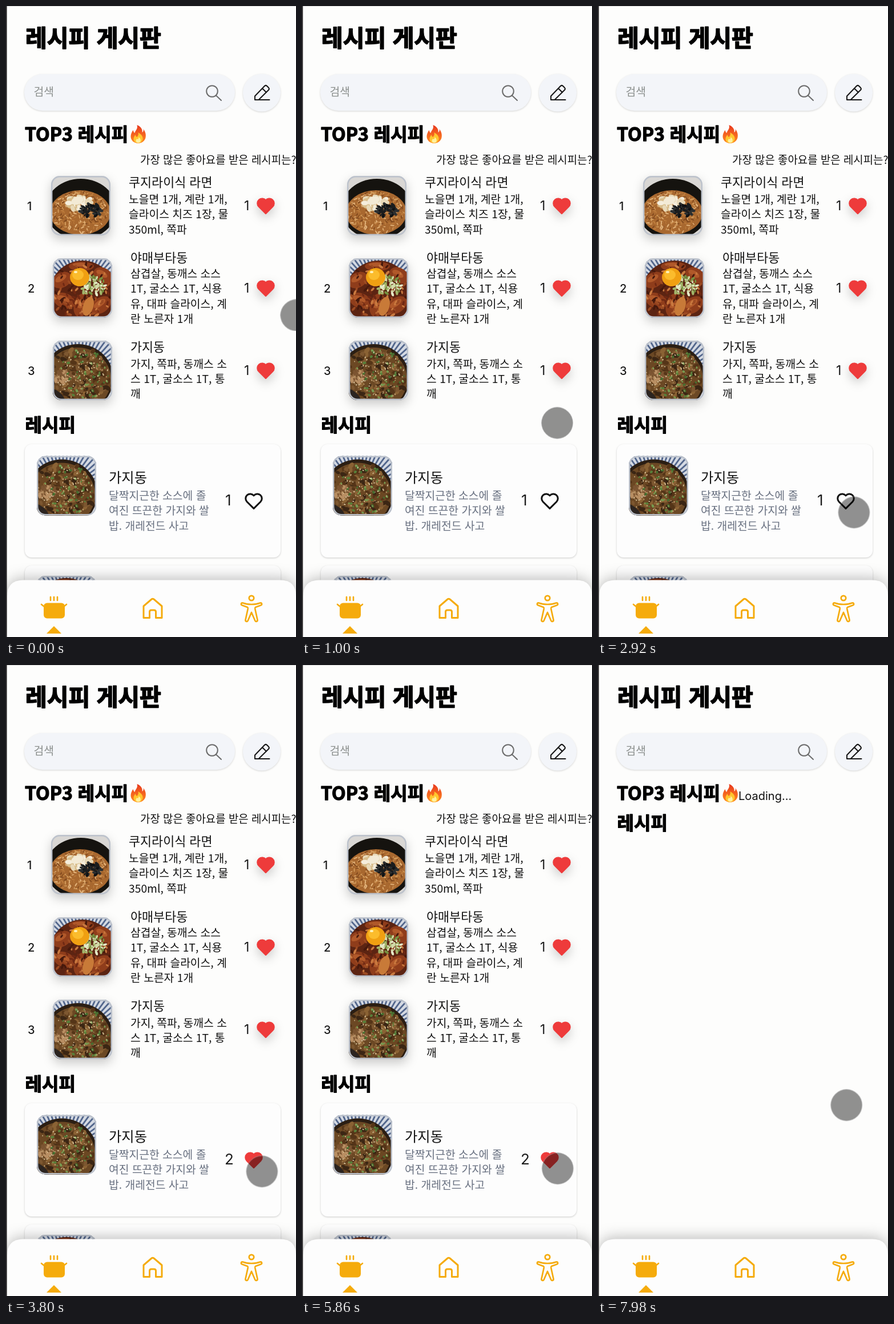
Write an HTML page that moves like this. It is 508 px wide and 1103 px high and loops after 8 s.

```html
<!DOCTYPE html>
<html lang="ko">
<head>
<meta charset="utf-8">
<title>레시피 게시판</title>
<style>
html, body { margin: 0; width: 100%; height: 100%; overflow: hidden; background: #fdfdfc; }
svg { display: block; }
text { font-family: "Noto Sans CJK KR", "Noto Sans CJK", sans-serif; white-space: pre; }
text.num { font-family: Inter, Roboto, sans-serif; }
text.heavy { stroke: #000; stroke-width: .04em; stroke-linejoin: round; }
.field { fill: #f3f5f9; filter: drop-shadow(0 1.5px 1.5px rgba(0, 0, 0, .16)); }
.card { fill: #fdfdfd; filter: drop-shadow(0 1px 1.5px rgba(0, 0, 0, .2)); }
.lift { filter: drop-shadow(0 7px 9px rgba(0, 0, 0, .2)); }
.bar { fill: #fdfdfd; filter: drop-shadow(0 -3px 12px rgba(0, 0, 0, .26)); }
.line { fill: none; stroke-linecap: round; stroke-linejoin: round; }
</style>
</head>
<body>
<svg id="stage" width="508" height="1103" viewBox="0 0 508 1103"></svg>
<script>
const LOOP = 8000, LIKE_AT = 3450, RELOAD_AT = 7800;
const ORANGE = '#f5ab0c', RED = '#ee3b3b';

// Text is placed by its left edge and vertical centre.
const text = (x, cy, s, size, weight = 300, fill = '#111', cls = '') =>
  `<text class="${cls}" x="${x}" y="${cy + size * .37}" font-size="${size}" font-weight="${weight}" fill="${fill}">${s}</text>`;
const num = (x, cy, s, size, weight = 400) => text(x, cy, s, size, weight, '#1c1c1c', 'num');
const heading = (x, cy, s, size) => text(x, cy, s, size, 900, '#000', 'heavy');
const lines = (x, cy, list, fill) =>
  list.map((s, i) => text(x, cy + i * 26.3, s, 19.3, 300, fill)).join('');
const stroke = (d, color, width) => `<path class="line" d="${d}" stroke="${color}" stroke-width="${width}"/>`;
const ellipse = (x, y, rx, ry, fill, turn = 0) =>
  `<ellipse cx="${x}" cy="${y}" rx="${rx}" ry="${ry}" fill="${fill}" transform="rotate(${turn} ${x} ${y})"/>`;
const heart = (x, y, fill = RED, edge = RED) =>
  `<path d="M7.5 .6L0 8L-7.5 .6A5 5 0 1 1 0-6A5 5 0 1 1 7.5 .6Z" transform="translate(${x} ${y}) scale(1.6)"
    fill="${fill}" stroke="${edge}" stroke-width="1.9" stroke-linejoin="round"/>`;

function random(seed) {
  return (lo, hi) => {
    seed = (seed * 16807) % 2147483647;
    return lo + (hi - lo) * seed / 2147483647;
  };
}

// Scatters small flecks over an elliptical area.
function flecks(seed, count, [cx, cy, rx, ry], colors, size, thin = .5) {
  const r = random(seed);
  let out = '';
  for (let i = 0; i < count; i++) {
    const a = r(0, 6.283), d = Math.sqrt(r(0, 1)), s = r(size * .5, size);
    out += ellipse((cx + Math.cos(a) * d * rx).toFixed(1), (cy + Math.sin(a) * d * ry).toFixed(1),
      s.toFixed(1), (s * thin).toFixed(1), colors[i % colors.length], r(0, 180) | 0);
  }
  return out;
}

function plate(cx, cy) {
  let out = '<rect width="104" height="104" fill="#d5dae3"/>';
  for (let a = 180; a < 360; a += 6)
    out += `<rect x="${cx + 45}" y="${cy - 1.4}" width="50" height="2.8" fill="#52668c" transform="rotate(${a} ${cx} ${cy})"/>`;
  return out;
}

const photos = {
  noodles: '<rect width="104" height="104" fill="#d9d7d4"/>' +
    ellipse(52, 58, 62, 53, '#15130f') + ellipse(51, 64, 53, 39, '#a8682f') +
    flecks(7, 300, [51, 64, 50, 37], ['#d29a5a', '#824a1f', '#bd7c3c', '#e2b279'], 4, .3) +
    flecks(13, 40, [50, 47, 20, 13], ['#e8d9b8', '#f5eddb', '#d8bd8b'], 8, .6) +
    ellipse(46, 43, 11, 7, '#f3ead5', -20) +
    flecks(11, 50, [70, 60, 19, 11], ['#1b1d1e', '#2c2f30', '#101214'], 5, .55),
  pork: plate(52, 60) + ellipse(52, 62, 58, 58, '#5c2412') +
    [[16, 38, 18, 13, -30], [88, 30, 18, 13, 30], [20, 74, 20, 13, 20], [50, 82, 13, 21, 15], [84, 82, 20, 13, -35], [50, 14, 22, 8, 0]]
      .map(([x, y, a, b, turn]) => ellipse(x, y, a, b, '#8f3d1b', turn) + ellipse(x - 2, y - 3, a * .6, b * .4, '#b1592a', turn)).join('') +
    flecks(5, 130, [52, 60, 54, 52], ['#6f2813', '#c9793f', '#47190c', '#9c4a22'], 5, .45) +
    ellipse(62, 84, 9, 17, '#c87a38', 18) +
    flecks(23, 75, [70, 49, 22, 18], ['#d3dba9', '#a3b56a', '#e6eac9', '#75903f'], 4.5, .5) +
    ellipse(47, 33, 17, 16, '#f0a012') + ellipse(44, 29, 10, 9, '#fbbc2c') + ellipse(40, 24, 3, 2, '#fff1b8'),
  eggplant: plate(46, 64) + ellipse(44, 66, 62, 60, '#2b1e13') + ellipse(44, 68, 58, 56, '#6b4824') +
    flecks(31, 170, [46, 64, 54, 50], ['#553518', '#8a6234', '#6b4722', '#3b2614', '#7d5730'], 7, .6) +
    flecks(37, 30, [18, 63, 15, 12], ['#b98f63', '#9a7048', '#7c5532'], 6, .5) +
    flecks(41, 55, [52, 60, 46, 44], ['#58803a', '#466f30', '#789a50'], 3.2, .7) +
    flecks(43, 130, [50, 60, 48, 46], ['#e0cda6', '#c3a272'], 1.7, .6) +
    ellipse(6, 96, 18, 8, '#2b2420', 38)
};

const photo = (name, x, y) => `<g transform="translate(${x} ${y})">
  <g clip-path="url(#frame)">${photos[name]}</g>
  <rect x="1.2" y="1.2" width="101.6" height="101.6" rx="14" fill="none" stroke="#bcc2cc" stroke-width="2.4"/></g>`;
const lift = s => `<g class="lift">${s}</g>`;

const ranks = [
  { name: 'noodles', shift: -3, top: 297, title: '쿠지라이식 라면', titleY: 308, bodyY: 338,
    body: ['노을면 1개, 계란 1개,', '슬라이스 치즈 1장, 물', '350ml, 쪽파'] },
  { name: 'pork', shift: 0, top: 441, title: '야매부타동', titleY: 440, bodyY: 468,
    body: ['삼겹살, 동깨스 소스', '1T, 굴소스 1T, 식용', '유, 대파 슬라이스, 계', '란 노른자 1개'] },
  { name: 'eggplant', shift: 0, top: 585, title: '가지동', titleY: 596, bodyY: 625.5,
    body: ['가지, 쪽파, 동깨스 소', '스 1T, 굴소스 1T, 통', '깨'] }
];
const rank = (r, i) => num(i ? 38 : 37, r.top + 53, i + 1, 20, 500) + lift(photo(r.name, 82 + r.shift, r.top)) +
  text(218 + r.shift, r.titleY, r.title, 21.8) + lines(218 + r.shift, r.bodyY, r.body) +
  num(417, r.top + 51, 1, 23) + lift(heart(455, r.top + 52.5));

const flame = `<g transform="translate(231.5 224)">
  <path d="M-2-16C6-13 8-7 7-3C9-4 10-7 9-9C13-4 14 1 13 6C12 12 6 16 0 16C-7 16-13 11-13 4C-13 0-11-4-9-7C-8-5-8-3-6-2C-5-7 0-9-2-16Z" fill="url(#fire)"/>
  <path d="M0-3C5 0 9 4 8 9C7 13 4 15.5 0 15.5C-5 15.5-8 12-8 8C-8 5-6 3-5 1C-4 4-3 5-2 5C0 3 1 0 0-3Z" fill="#ffc62f"/>
  <path d="M1 5C4 8 5 10 4 13C2 16-3 16-4 12C-4 10-3 9-2 8C-1 10 1 9 1 5Z" fill="#fff0a0"/></g>`;

const header = heading(34, 56, '레시피 게시판', 41) +
  '<rect class="field" x="32" y="119" width="369" height="64" rx="32"/>' +
  text(48.5, 150, '검색', 19.3, 300, '#8b8f8d') +
  '<circle cx="361" cy="149" r="9.8" fill="none" stroke="#6b6b6b" stroke-width="2"/>' + stroke('M368 156.5L377 165', '#6b6b6b', 2) +
  '<circle class="field" cx="448" cy="151.5" r="33"/>' +
  stroke('M436 164V157.5L453 139.8Q455 138 457 139.8L460 142.8Q461.8 144.8 460 146.8L442.5 164ZM442.5 164H461.5M449 144L456 151', '#161616', 2) +
  heading(33, 224, 'TOP3 레시피', 32) + flame;

const list = text(235, 269, '가장 많은 좋아요를 받은 레시피는?', 18.9) + ranks.map(rank).join('') +
  heading(33.5, 732, '레시피', 32) +
  '<rect class="card" x="33" y="766" width="448" height="198" rx="12"/><rect class="card" x="33" y="978" width="448" height="198" rx="12"/>' +
  photo('eggplant', 54, 786.5) + photo('pork', 54, 996) +
  text(180, 824, '가지동', 24.3) +
  lines(180, 856, ['달짝지근한 소스에 졸', '여진 뜨끈한 가지와 쌀', '밥. 개레전드 사고'], '#687080') +
  '<g id="before">' + num(384, 863, 1, 26) + heart(434, 865.5, 'none', '#111') + '</g>' +
  '<g id="after">' + num(383, 863, 2, 26) + heart(434, 865.5) + '</g>';

const nav = '<path class="bar" d="M2 1103V1032Q2 1003.5 31 1003.5H480Q508 1003.5 508 1032V1103Z"/>' +
  `<rect x="66" y="1043.5" width="37" height="27" rx="6" fill="${ORANGE}"/><path d="M71 1097L84 1084L97 1097Z" fill="${ORANGE}"/>` +
  stroke('M62 1046L67 1050M106 1046L101 1050M78 1033V1039M84 1033V1039M90 1033V1039', ORANGE, 2.6) +
  stroke('M241 1049L255 1037Q257 1035.5 259 1037L273 1049V1069.5H262.5V1059Q262.5 1056 259.5 1056H254.5Q251.5 1056 251.5 1059V1069.5H241Z', ORANGE, 3) +
  `<circle cx="430" cy="1035" r="4.2" fill="none" stroke="${ORANGE}" stroke-width="2.8"/>` +
  stroke('M415 1043.5C420 1045.5 425 1046 430 1046S440 1045.5 445 1043.5C448.5 1042.8 449 1046.5 446.5 1047.5L437 1051Q436 1051.5 436.3 1054L440.5 1073C441 1076 437.5 1077 436.3 1074.5L430 1060L423.7 1074.5C422.5 1077 419 1076 419.5 1073L423.7 1054Q424 1051.5 423 1051L413.5 1047.5C411 1046.5 411.5 1042.8 415 1043.5Z', ORANGE, 2.7);

const stage = document.getElementById('stage');
stage.innerHTML = `<defs>
  <clipPath id="frame"><rect width="104" height="104" rx="15"/></clipPath>
  <linearGradient id="fire" x1="0" y1="0" x2="0" y2="1"><stop offset="0" stop-color="#e8391f"/><stop offset="1" stop-color="#ff8a1f"/></linearGradient></defs>
  <rect width="508" height="1103" fill="#fdfdfc"/>${header}
  <g id="list">${list}</g>
  <g id="loading">${text(246, 229, 'Loading...', 20, 400, '#111', 'num')}${heading(33.5, 276, '레시피', 32)}</g>
  ${nav}
  <rect width="508" height="1" fill="#dcdcdc"/><rect width="1.5" height="1103" fill="#1d1b1c"/>
  <circle id="pointer" r="27.4" fill="#000" fill-opacity=".43" stroke="#aaa" stroke-opacity=".6"/>`;

const timing = { duration: LOOP, iterations: Infinity };
const play = (id, frames) => document.getElementById(id).animate(frames, timing);

// Shows a group from one time to another with hard edges.
function show(id, from, to) {
  const at = (ms, on) => ({ offset: ms / LOOP, opacity: on, easing: 'step-end' });
  const frames = [at(from, 1), at(to, to < LOOP ? 0 : 1)];
  if (from > 0) frames.unshift(at(0, 0));
  if (to < LOOP) frames.push(at(LOOP, 0));
  play(id, frames);
}
show('before', 0, LIKE_AT);
show('after', LIKE_AT, LOOP);
show('list', 0, RELOAD_AT);
show('loading', RELOAD_AT, LOOP);

const path = [
  [0, 508.3, 540.3, 'linear'],
  [1000, 447, 728.5, 'ease-out'],
  [1900, 448.4, 885.3, 'linear'],
  [5725, 448.4, 885.3, 'ease-in-out'],
  [6640, 435.2, 769.3, 'linear'],
  [LOOP, 435.2, 769.3, 'linear']
];
play('pointer', path.map(([ms, x, y, easing]) =>
  ({ offset: ms / LOOP, transform: `translate(${x}px, ${y}px)`, easing })));
</script>
</body>
</html>
```
